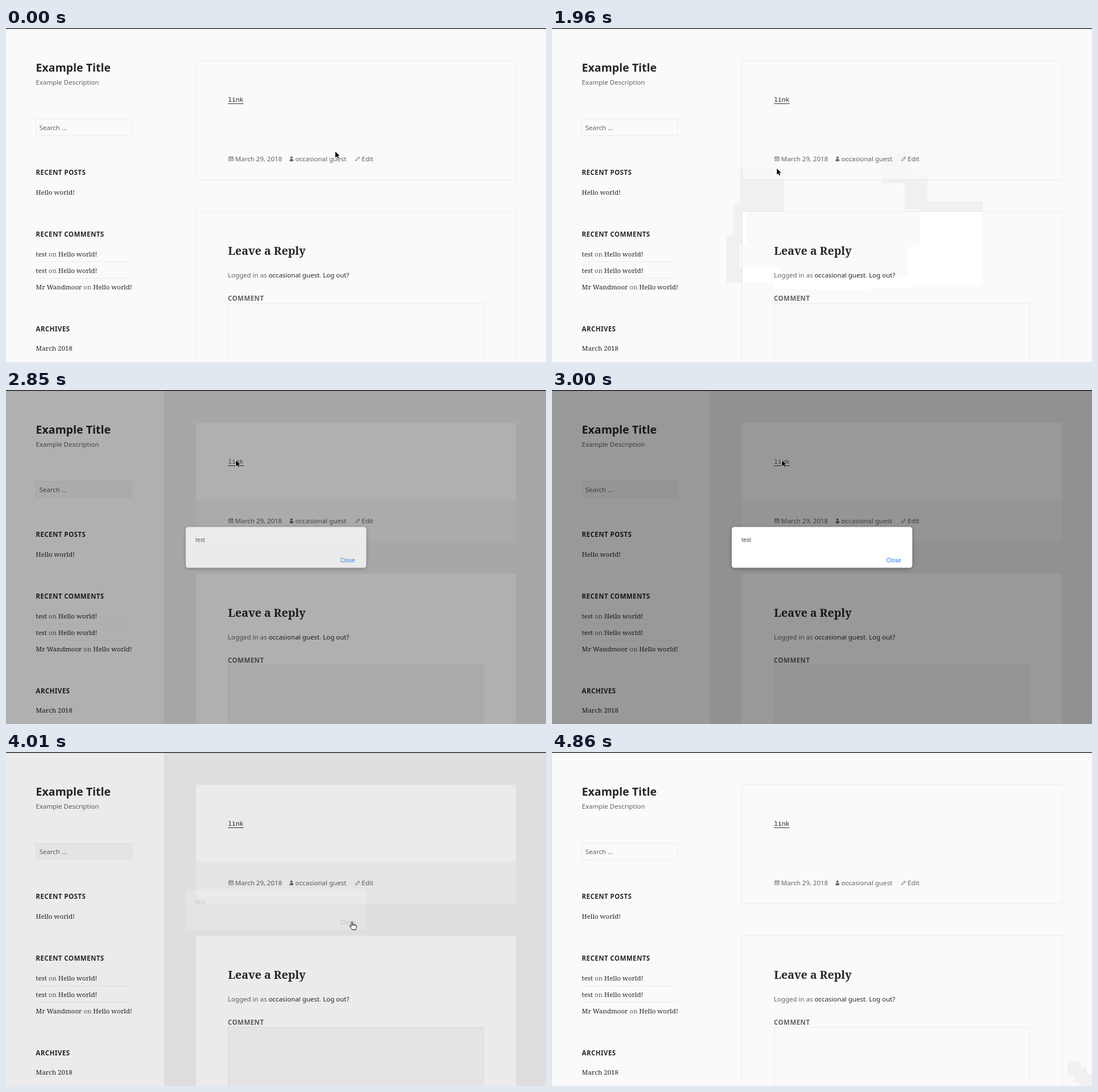
An HTML page that plays this animation: 951x589 px, repeating every 5160 ms.

```html
<!DOCTYPE html>
<html lang="en">
<head>
<meta charset="utf-8">
<title>Link dialog</title>
<style>
html, body { margin: 0; width: 100%; height: 100%; overflow: hidden; background: #fafafa; }
svg { display: block; width: 951px; height: 589px; }
text { font: 11.5px "Noto Sans", sans-serif; fill: #262626; white-space: pre; }
.soft { fill: #626262; }
.head { font-weight: 700; letter-spacing: .04em; }
.serif { font-family: "Noto Serif", serif; }
.title { font-weight: 700; font-size: 19.6px; }
.reply { font-weight: 700; font-size: 19.6px; }
.mono { font: 11.25px "Noto Sans Mono", monospace; }
.ui { font: 9.7px Inter, sans-serif; fill: #444; }
.line { fill: none; stroke: #000; stroke-opacity: .06; }
.icon { fill: none; stroke: #686868; stroke-width: .9; }
.icon .solid { fill: #686868; stroke: none; }
</style>
</head>
<body>
<svg viewBox="0 0 951 589">
  <clipPath id="clip"><path id="shown"/></clipPath>
  <rect width="951" height="589" fill="#fafafa"/>
  <g clip-path="url(#clip)">
    <rect width="951" height="589" fill="#f1f1f1"/>
    <path d="M0 0h278v589H0zM335 58h563v136H335zM335 324h563v265H335z" fill="#fff"/>
    <path d="M335 194h563v73H335zM53 161h168v28H53zM391 485h450v104H391z" fill="#f7f7f7"/>
  </g>
  <path id="frame" class="line" d="M334.5 57.5h564v210h-564zM334.5 589V323.5h564V589"/>
  <path class="line" d="M52.5 161H221.5V189.5H52.5zM53 412.5H221M53 441.5H221M391.5 589V485.5H841.5V589"/>
  <rect width="951" height="1.4" fill="#1d1d22"/>

  <text class="title" x="52.5" y="77">Example Title</text>
  <text class="soft" x="52.6" y="100">Example Description</text>
  <text class="soft" x="58.8" y="179.5">Search …</text>
  <text class="head" x="52.5" y="259">RECENT POSTS</text>
  <text class="serif" x="52.6" y="294">Hello world!</text>
  <text class="head" x="52.5" y="368">RECENT COMMENTS</text>
  <text class="serif" x="52.6" y="402.5">test<tspan class="soft"> on </tspan>Hello world!</text>
  <text class="serif" x="52.6" y="432">test<tspan class="soft"> on </tspan>Hello world!</text>
  <text class="serif" x="52.6" y="461">Mr Wandmoor<tspan class="soft"> on </tspan>Hello world!</text>
  <text class="head" x="52.6" y="534.5">ARCHIVES</text>
  <text class="serif" x="52.6" y="569">March 2018</text>

  <text id="link" class="mono" x="391" y="130">link</text>
  <path d="M391 133.5h27.5" stroke="#333"/>
  <g class="icon">
    <path d="M392.5 227.5h7.5v6.5h-7.5zM392.5 229.5h7.5M394.5 226v1.5M398 226v1.5M394 231.7h4.5"/>
    <path d="M615.8 234.2l.7-2.4 4.6-4.6 1.7 1.7-4.6 4.6zM620 228.3l1.7 1.7"/>
    <path class="solid" d="M499.5 235v-1.6q0-2.4 2-2.4h2.5q2 0 2 2.4V235z"/>
    <circle class="solid" cx="502.7" cy="228.6" r="2"/>
  </g>
  <text class="soft" x="403.6" y="235">March 29, 2018</text>
  <text class="soft" x="509.6" y="235">occasional guest</text>
  <text class="soft" x="626.3" y="235">Edit</text>

  <text class="serif reply" x="390.9" y="399.5">Leave a Reply</text>
  <text x="390.7" y="440"><tspan class="soft">Logged in as </tspan>occasional guest<tspan class="soft">. </tspan>Log out?</text>
  <text class="head soft" x="390.7" y="480.5">COMMENT</text>

  <rect id="shade" width="951" height="589"/>
  <g id="dialog">
    <rect id="shadow" x="316.5" y="243" width="318" height="72" rx="5" style="filter:blur(3px)" opacity=".35"/>
    <rect x="316.5" y="241.5" width="318" height="72" rx="4.5" fill="#fff"/>
    <path id="rule" d="M510 284.5H622" stroke="#e4e4e4"/>
    <text class="ui" x="333.7" y="268">test</text>
    <text id="close" class="ui" x="588.7" y="303.8">Close</text>
  </g>
  <g id="arrow">
    <path transform="scale(.85)" d="M0 0V12.3L2.9 9.700 4.8 14 6.9 13.1 5 8.9H8.900z" stroke="#fff" stroke-width="1.3" paint-order="stroke" stroke-linejoin="round"/>
  </g>
  <g id="hand">
    <path d="M-1.3 8V1.2Q-1.3 0-.2 0 1 0 1 1.2V4.6Q3 3.7 3.4 5 5.2 4.3 5.7 5.7 7.6 5.2 7.6 7V9.5Q7.6 11 6.6 12.3V14H.2V12.7Q-1.7 11.300-3.9 7.900-4.5 6.500-3.4 6.300-2.5 6.300-1.3 8zM1 4.600V7M3.4 5V7.200M5.7 5.700V7.500" fill="#fff" stroke="#111" stroke-linejoin="round"/>
  </g>
</svg>
<script>
const LOOP = 5160, STEP = 150;
const OPEN = 2850, CLOSED = 4150, HOVER = 3700;
const $ = id => document.getElementById(id);
const set = (id, name, value) => $(id).setAttribute(name, value);
const show = (id, on) => set(id, 'visibility', on ? 'visible' : 'hidden');
const box = (x, y, w, h) => `M${x} ${y}h${w}v${h}h${-w}z`;

// key points of the pointer's way: time, x, y
const keys = [
  [0, 580, 218], [150, 621, 259], [310, 649, 305], [460, 746, 386], [760, 746, 386],
  [910, 627, 438], [1210, 474, 446], [1510, 307, 422], [1810, 331, 309],
  [1960, 396, 248], [2110, 361, 215], [2400, 354, 160], [2550, 388, 140], [2700, 405, 124],
  [3050, 405, 124], [3350, 510, 225], [HOVER, 609.5, 299.5],
  [4010, 609.5, 299.5], [CLOSED, 908, 545], [4210, 908, 545], [4860, 951, 589]
];

// The pointer jumps about every STEP ms; each jump repaints the area it crossed.
const jumps = [{ t: 0, x: 580, y: 218, area: '' }];
for (let k = 1; k < keys.length; k++) {
  const from = keys[k - 1], to = keys[k];
  const count = Math.max(1, Math.round((to[0] - from[0]) / STEP));
  for (let i = 1; i <= count; i++) {
    const [t, x, y] = from.map((v, j) => v + (to[j] - v) * i / count);
    const last = jumps[jumps.length - 1];
    const area = box(Math.min(x, last.x), Math.min(y, last.y),
      Math.abs(x - last.x) + 12, Math.abs(y - last.y) + 15);
    jumps.push({ t, x, y, area: x === last.x && y === last.y ? '' : area });
  }
}

function fade(t) {
  if (t < OPEN || t >= CLOSED) return 0;
  if (t < OPEN + STEP) return .775;
  return t < 4010 ? 1 : .2;
}

function draw(t) {
  const level = fade(t);
  const open = level > 0;
  const hand = t >= HOVER && t < CLOSED;
  const past = jumps.filter(j => j.t <= t);
  const { x, y } = past[past.length - 1];
  const trail = past.filter(j => t < OPEN || j.t > CLOSED).map(j => j.area).join('');

  set('shown', 'd', open ? box(0, 0, 951, 589) : trail);
  show('frame', !open);
  set('shade', 'opacity', level * .4);
  set('dialog', 'opacity', level);
  show('shadow', level > .5);
  show('rule', t >= 3500 && t < 4010);
  set('close', 'style', 'fill:' + (t >= HOVER ? '#0b4f9e' : '#1a6ff5'));
  set('link', 'style', 'fill:' + (t >= 2700 && t < 3200 ? '#606060' : '#222'));
  for (const id of ['arrow', 'hand']) {
    set(id, 'transform', `translate(${x} ${y})`);
    show(id, (id === 'hand') === hand);
  }
}

const start = performance.now();
function tick() {
  draw((performance.now() - start) % LOOP);
  requestAnimationFrame(tick);
}
draw(0);
requestAnimationFrame(tick);
</script>
</body>
</html>
```
